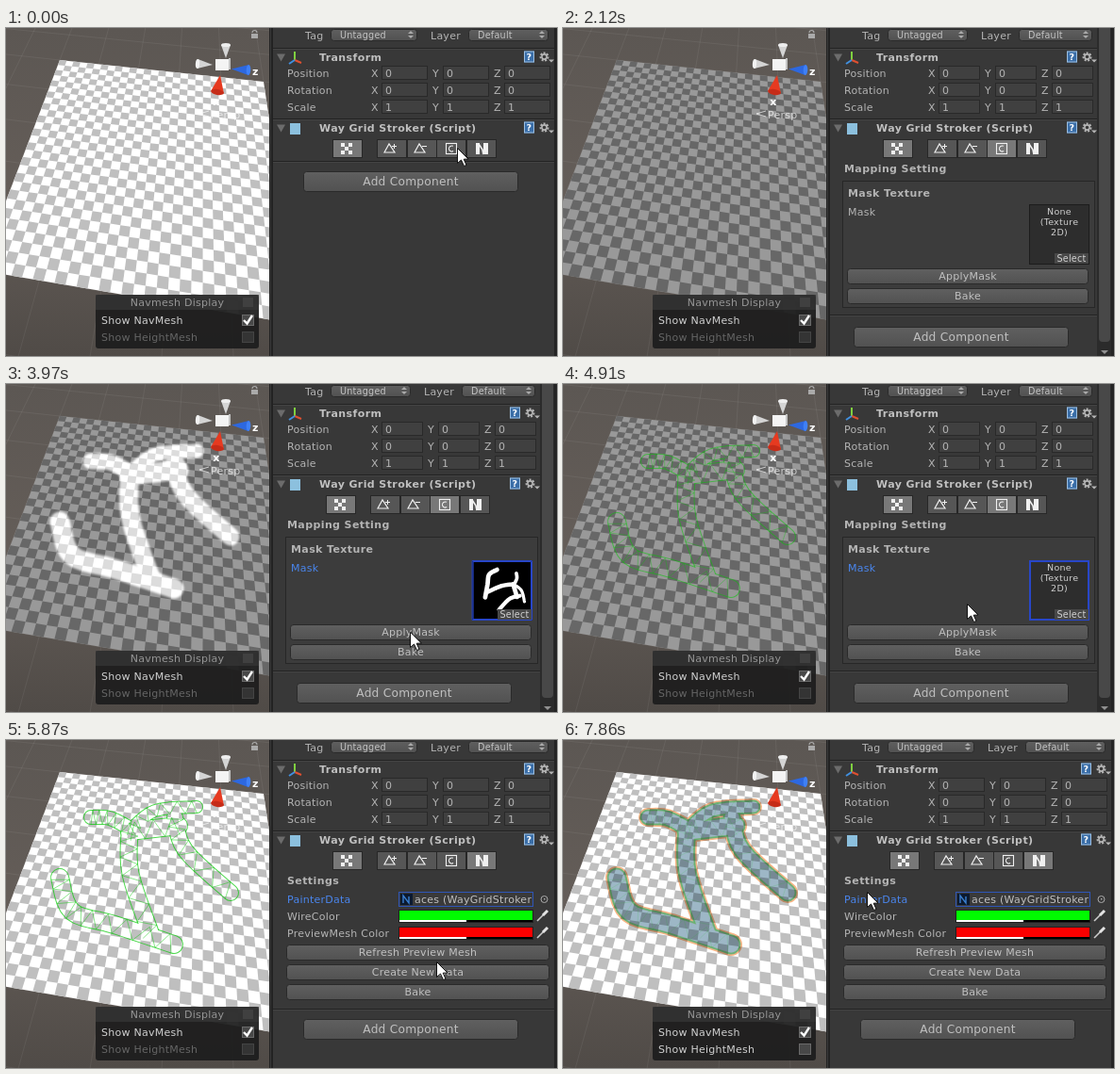
Recreate the animation shown at these times as an HTML page with a canvas. Size 584x348 px, loop 8000 ms.

```html
<!DOCTYPE html>
<html>
<head>
<meta charset="utf-8">
<style>
html, body { margin: 0; width: 584px; height: 348px; overflow: hidden; background: #383838; }
canvas { display: block; }
</style>
</head>
<body>
<canvas id="stage" width="584" height="348"></canvas>
<script>
const W = 584, H = 348, LOOP = 8000, CELLS = 28, STEP = 130;
let c = document.getElementById('stage').getContext('2d');

// ---------- drawing helpers ----------
function rect(x, y, w, h, fill) { c.fillStyle = fill; c.fillRect(x, y, w, h); }

function frame(x, y, w, h, color) {
  c.strokeStyle = color; c.lineWidth = 1;
  c.strokeRect(x + .5, y + .5, w - 1, h - 1);
}

function poly(points, fill, stroke, width = 1, open) {
  c.beginPath();
  points.forEach(([x, y]) => c.lineTo(x, y));
  if (!open) c.closePath();
  if (fill) { c.fillStyle = fill; c.fill(); }
  if (stroke) { c.strokeStyle = stroke; c.lineWidth = width; c.stroke(); }
}
const line = (points, color, width) => poly(points, null, color, width, true);
const triangle = (x, y, w, h, fill) => poly([[x - w, y - h], [x + w, y - h], [x, y + h]], fill);

function circle(x, y, r, color, width, from = 0, to = 7) {
  c.beginPath(); c.arc(x, y, r, from, to);
  c.strokeStyle = color; c.lineWidth = width; c.stroke();
}

// a cone whose tip lies (dx, dy) away from the middle of its base
function cone(x, y, dx, dy, r, side, base) {
  const len = Math.hypot(dx, dy), nx = -dy / len * r, ny = dx / len * r;
  poly([[x + nx, y + ny], [x - nx, y - ny], [x + dx, y + dy]], side);
  c.beginPath(); c.ellipse(x, y, r, r * .42, Math.atan2(ny, nx), 0, 7);
  c.fillStyle = base; c.fill();
}

// y is the middle of the capitals
function text(s, x, y, { color = '#b4b4b4', size = 11, bold = false, align = 'left' } = {}) {
  c.font = `${bold ? 'bold ' : ''}${size}px "DejaVu Sans", sans-serif`;
  c.letterSpacing = bold ? '.4px' : '.25px';
  c.textAlign = align; c.fillStyle = color;
  c.fillText(s, x, Math.round(y + size * .36));
}

function button(x, y, w, h, label, { size, pressed } = {}) {
  const g = c.createLinearGradient(0, y, 0, y + h);
  g.addColorStop(0, pressed ? '#505050' : '#606060');
  g.addColorStop(1, pressed ? '#5e5e5e' : '#515151');
  c.beginPath(); c.roundRect(x + .5, y + .5, w - 1, h - 1, 3);
  c.fillStyle = g; c.fill();
  c.strokeStyle = '#2a2a2a'; c.lineWidth = 1; c.stroke();
  text(label, x + w / 2, y + h / 2, { size, align: 'center', color: '#c0c0c0' });
}

function layer(draw) {
  const canvas = document.createElement('canvas'), saved = c;
  canvas.width = W; canvas.height = H;
  c = canvas.getContext('2d');
  draw();
  c = saved;
  return canvas;
}

// ---------- perspective ----------
function squareTo([x0, y0], [x1, y1], [x2, y2], [x3, y3]) {
  const ax = x1 - x2, ay = y1 - y2, bx = x3 - x2, by = y3 - y2;
  const sx = x0 - x1 + x2 - x3, sy = y0 - y1 + y2 - y3, d = ax * by - bx * ay;
  const g = (sx * by - bx * sy) / d, h = (ax * sy - sx * ay) / d;
  return [x1 - x0 + g * x1, x3 - x0 + h * x3, x0, y1 - y0 + g * y1, y3 - y0 + h * y3, y0, g, h, 1];
}
const inverse = ([a, b, p, d, e, q, g, h, i]) =>
  [e * i - q * h, p * h - b * i, b * q - p * e, q * g - d * i, a * i - p * g, p * d - a * q,
   d * h - e * g, b * g - a * h, a * e - b * d];
const apply = (m, x, y) => {
  const [X, Y, w] = [0, 3, 6].map(k => m[k] * x + m[k + 1] * y + m[k + 2]);
  return [X / w, Y / w];
};

const view = squareTo([57, 34], [273, 57], [312, 315], [-28, 257]), unview = inverse(view);
const project = (u, v) => apply(view, u, v);
const tile = (u, v, s) => [project(u, v), project(u + s, v), project(u + s, v + s), project(u, v + s)];

const plane = (light, dark) => layer(() => {
  poly(tile(0, 0, 1), light);
  for (let i = 0; i < CELLS; i++)
    for (let j = i % 2; j < CELLS; j += 2) poly(tile(i / CELLS, j / CELLS, 1 / CELLS), dark);
});

// ---------- painted strokes ----------
// Catmull-Rom curve through a few key points
function smooth(p, steps = 6) {
  const at = i => p[Math.max(0, Math.min(p.length - 1, i))];
  return Array.from({ length: (p.length - 1) * steps + 1 }, (_, n) => {
    const i = Math.floor(n / steps), t = n / steps - i;
    return [0, 1].map(k => {
      const [a, b, d, e] = [-1, 0, 1, 2].map(o => at(i + o)[k]);
      return b + .5 * t * (d - a + t * (2 * a - 5 * b + 4 * d - e + t * (3 * (b - d) + e - a)));
    });
  });
}
const strokes = [
  { width: 15, points: [[90, 82], [110, 83], [132, 94]] },
  { width: 13, points: [[132, 95], [158, 75], [202, 71]] },
  { width: 19, points: [[131, 97], [183, 91]] },
  { width: 17, points: [[179, 82], [190, 117], [238, 162]] },
  { width: 18, points: [[131, 97], [132, 142], [154, 207]] },
  { width: 19, points: [[57, 146], [70, 182], [115, 196], [178, 217]] }
].map(s => ({ ...s, points: smooth(s.points) }));

function brush(color, grow) {
  c.lineCap = c.lineJoin = 'round';
  for (const s of strokes) line(s.points, color, s.width + grow);
}

// triangle strip: every other point steps to the opposite side
function zigzag({ width, points }) {
  const sides = points.map(([x, y], i) => {
    const [ax, ay] = points[Math.max(0, i - 1)], [bx, by] = points[Math.min(points.length - 1, i + 1)];
    const k = (i % 2 - .5) * width / Math.hypot(bx - ax, by - ay);
    return [x + (by - ay) * k, y - (bx - ax) * k];
  });
  line(sides, '#00c80090', .8);
}

const brightPlane = plane('#fff', '#bfbfbf'), dimPlane = plane('#999', '#676767');
const maskLayer = layer(() => {
  c.filter = 'blur(1.1px)'; brush('#fff', 2); c.filter = 'none';
  c.globalCompositeOperation = 'source-in';
  c.drawImage(plane('#fff', '#dcdcdc'), 0, 0);
});
const wireLayer = layer(() => {
  brush('#00c800b0', 1);
  c.globalCompositeOperation = 'destination-out';
  brush('#000', -1);
  c.globalCompositeOperation = 'source-over';
  c.lineJoin = 'bevel';
  strokes.forEach(zigzag);
});
const meshLayer = layer(() => {
  c.filter = 'blur(.7px)';
  brush('#f7b584', 5); brush('#7fae88', 2); brush('#9db7c6', -2);
});
const ground = layer(() => {
  const g = c.createLinearGradient(0, 0, 0, H);
  g.addColorStop(0, '#5c5753'); g.addColorStop(.5, '#645d58'); g.addColorStop(1, '#504b47');
  rect(0, 0, 280, H, g);
  for (let k = -.6; k <= 1.7; k += .2) {
    line([project(k, -.4), project(k, 1.6)], '#ffffff10');
    line([project(-.6, k), project(1.6, k)], '#ffffff10');
  }
});

// ---------- scene view ----------
function gizmo() {
  const pale = '#ffffffa8', bold = { bold: true, color: '#fff' };
  cone(233, 18, 0, 14, 5, '#d4d4d4', '#eee');
  cone(203, 38, 16, 1, 5, '#d4d4d4', '#f2f2f2');
  cone(257, 44.5, -18, -1, 5.5, '#2d68e0', '#3f80f5');
  rect(222, 33, 14, 12, '#f4f4f4'); rect(236, 32, 2, 12, '#c4c4c4');
  cone(224, 68, 3, -18, 7, '#e63a20', '#c62c18');
  text('z', 261, 46, bold);
  text('x', 223, 78, { ...bold, align: 'center' });
  text('Persp', 217, 92, { color: pale });
  line([[215, 88], [205, 91], [215, 94]], pale);
  rect(260, 6, 7, 5, '#aaa');
  circle(263.5, 5, 2.5, '#aaa', 1.2, Math.PI, 0);
}

function checkRow(label, y, checked, enabled) {
  text(label, 101, y, { color: enabled ? '#d0d0d0' : '#656565' });
  rect(250, y - 6, 13, 12, enabled ? '#484848' : '#343434');
  frame(250, y - 6, 13, 12, enabled ? '#6a6a6a' : '#444');
  if (checked) line([[252, y], [255.5, y + 3.5], [261, y - 5]], '#fff', 2.4);
}

function display(baked) {
  c.beginPath(); c.roundRect(95, 283, 173, 57, 3); c.fillStyle = '#1d1d1dee'; c.fill();
  rect(95, 283, 173, 16, '#363636c0');
  rect(251, 286, 11, 10, '#404040');
  text('Navmesh Display', 181.5, 291, { color: '#959595', align: 'center' });
  checkRow('Show NavMesh', 310, true, true);
  checkRow('Show HeightMesh', 328, false, baked);
}

function scene(st) {
  c.save();
  c.beginPath(); c.rect(0, 0, 279, H); c.clip();
  c.drawImage(ground, 0, 0);
  c.drawImage(st.dim ? dimPlane : brightPlane, 0, 0);
  if (st.mask) c.drawImage(maskLayer, 0, 0);
  if (st.baked) {
    c.globalCompositeOperation = 'multiply';
    c.drawImage(meshLayer, 0, 0);
    c.globalCompositeOperation = 'source-over';
  }
  if (st.wired) {
    c.globalAlpha = st.baked ? .25 : st.dim ? .75 : 1;
    c.drawImage(wireLayer, 0, 0);
    c.globalAlpha = 1;
  }
  gizmo();
  display(st.baked);
  c.restore();
}

// ---------- inspector ----------
function divider(y, right) { rect(283, y, right - 283, 1, '#222'); rect(283, y + 1, right - 283, 1, '#444'); }

function popup(x, w, label) {
  button(x, 1, w, 13, '');
  text(label, x + 10, 7.5, { size: 9.6, color: '#c4c4c4' });
  triangle(x + w - 7, 4.5, 3, -1.5, '#aaa');
  triangle(x + w - 7, 9.5, 3, 1.5, '#aaa');
}

function header(title, y, right) {
  triangle(291.5, y, 4.5, 4, '#6c6c6c');
  text(title, 332, y, { bold: true, color: '#c0c0c0' });
  rect(right - 32, y - 7, 11, 12, '#3a6ea8'); frame(right - 32, y - 7, 11, 12, '#9dbfe0');
  text('?', right - 26.5, y - 1, { size: 9.5, bold: true, align: 'center', color: '#fff' });
  c.setLineDash([2, 1.5]);
  circle(right - 10.5, y - 1, 4, '#b5b5b5', 2);
  c.setLineDash([]);
  circle(right - 10.5, y - 1, 2.6, '#b5b5b5', 1.6);
  triangle(right - 3, y + 3.5, 3, 1.5, '#b5b5b5');
}

function transform(right) {
  header('Transform', 31.5, right);
  line([[306, 34], [306, 25]], '#7fd040', 2);
  line([[306, 34], [313, 37]], '#e05030', 2);
  line([[306, 34], [300, 38]], '#4090e0', 2);
  const pitch = (right - 386) / 3;
  ['Position', 'Rotation', 'Scale'].forEach((name, row) => {
    const y = 48 + row * 18;
    text(name, 298, y);
    ['X', 'Y', 'Z'].forEach((axis, col) => {
      const x = 387 + col * pitch;
      text(axis, x, y);
      rect(x + 11, y - 8, pitch - 16, 15, '#404040'); frame(x + 11, y - 8, pitch - 16, 15, '#292929');
      text(row === 2 ? '1' : '0', x + 15, y);
    });
  });
}

function tabs(dx, active) {
  const ink = '#f0f0f0';
  const cell = (x, on) => {
    rect(x, 118, 31, 20, on ? '#787878' : '#565656');
    frame(x, 118, 32, 20, '#272727');
  };
  c.save();
  c.translate(dx, 0);
  cell(346, true);
  for (let i = 0; i < 9; i += 2) rect(355 + i % 3 * 4, 122 + (i / 3 | 0) * 4, 4, 4, ink);
  for (let i = 0; i < 4; i++) cell(393 + Math.round(i * 31.5), active === i);
  for (const x of [401, 433]) {
    poly([[x, 132], [x + 5, 123], [x + 11, 132]], null, ink, 1.2);
    rect(x + 8, 125, 5, 1, ink);
  }
  rect(411, 123, 1, 5, ink);
  c.strokeStyle = ink; c.lineWidth = 1.1; c.strokeRect(466.5, 122.5, 11, 11);
  circle(472.5, 128, 3, ink, 1.1, 1, 5.2);
  rect(498, 122, 4, 12, ink); rect(506, 122, 5, 12, ink);
  line([[501, 123], [505, 129], [506, 134]], ink, 1.6);
  c.restore();
}

function thumbnail() {
  c.lineCap = c.lineJoin = 'round';
  for (const s of strokes)
    line(s.points.map(([x, y]) => {
      const [u, v] = apply(unview, x, y);
      return [494 + 64 * (1 - v), 187 + 64 * u];
    }), '#fff', s.width / 4);
}

function mappingTab(st) {
  text('Mapping Setting', 298, 149, { bold: true });
  rect(296, 162, 268, 135, '#3c3c3c'); frame(296, 162, 268, 135, '#272727');
  text('Mask Texture', 302, 175, { bold: true });
  text('Mask', 302, 195, { color: st.focus ? '#4a86ee' : '#b4b4b4' });
  rect(494, 187, 64, 64, st.mask ? '#000' : '#2d2d2d');
  if (st.mask) thumbnail();
  else ['None', '(Texture', '2D)'].forEach((s, i) =>
    text(s, 526, 194.5 + i * 11, { size: 9.5, align: 'center', color: '#d0d0d0' }));
  frame(494, 187, 64, 64, st.focus ? '#2846c8' : '#1c1c1c');
  if (st.focus) frame(495, 188, 62, 62, '#2846c8');
  rect(521, 239, 36, 11, '#484848');
  text('Select', 539, 244.5, { size: 9.6, align: 'center', color: '#d0d0d0' });
  button(301, 255, 256, 17, 'ApplyMask', { pressed: st.applying });
  button(301, 276, 256, 17, 'Bake');
  return 304;
}

function colorRow(label, y, color) {
  text(label, 298, y);
  rect(416, y - 7, 143, 14, '#202020');
  rect(417, y - 6, 141, 10, color);
  rect(417, y + 4, 71, 2, '#fff'); rect(488, y + 4, 70, 2, '#000');
  line([[563, y + 5], [570, y - 2]], '#ccc', 1.6);
  line([[569, y - 1], [574, y - 6]], '#e4e4e4', 3);
}

function settingsTab(st) {
  text('Settings', 298, 149, { bold: true });
  text('PainterData', 298, 169, { color: '#4a86ee' });
  rect(416, 161, 143, 16, '#3a3a3a'); frame(416, 161, 143, 16, '#2f56b8');
  rect(418, 163, 13, 12, '#0c1a30');
  line([[421, 173], [421, 165], [427, 173], [427, 166]], '#3a7fd0', 1.4);
  c.save();
  c.beginPath(); c.rect(417, 162, 140, 14); c.clip();
  text('aces (WayGridStroker', 433, 169, { color: '#c0c0c0' });
  c.restore();
  circle(570.5, 169, 3.5, '#aaa', 1);
  rect(570, 168, 1.5, 1.5, '#aaa');
  colorRow('WireColor', 187, '#00fb00');
  colorRow('PreviewMesh Color', 205, '#fb0000');
  ['Refresh Preview Mesh', 'Create New Data', 'Bake'].forEach((label, i) =>
    button(297, 217 + i * 21, 279, 17, label, { pressed: i === 2 && st.baking }));
  return 285;
}

function inspector(st) {
  const mapping = st.tab === 'mapping', right = mapping ? 566 : 581, dx = mapping ? -7 : 0;
  rect(279, 0, 305, H, '#383838');
  rect(279, 0, 4, H, '#222'); rect(280, 0, 1, H, '#3a3a3a');
  text('Tag', 317, 8);
  popup(344, 92 + dx, 'Untagged');
  text('Layer', 450 + dx, 8);
  popup(490 + dx, 85 + dx, 'Default');
  divider(21, right);
  transform(right);
  divider(96, right);
  header('Way Grid Stroker (Script)', 106.5, right);
  rect(301, 101, 11, 12, '#8cc0de');
  tabs(dx, st.lit);
  const end = mapping ? mappingTab(st) : st.tab === 'settings' ? settingsTab(st) : 141;
  divider(end, right);
  button(315 + dx, end + (mapping ? 13 : 11), 228, 22, 'Add Component', { size: 12.2 });
  if (mapping) {
    rect(566, 0, 15, H, '#2b2b2b');
    c.beginPath(); c.roundRect(568, -5, 12, 338, 4); c.fillStyle = '#484848'; c.fill();
    triangle(574, 344, 4, 2, '#909090');
  }
  rect(581, 0, 3, H, '#242424');
}

// ---------- pointer ----------
const moves = [
  { at: 0, x: 478, y: 127 },
  { at: 590, time: 150, x: 471, y: 126 },
  { at: 960, time: 450, x: 530, y: 239 },
  { at: 1970, x: 417, y: 294 },
  { at: 3110, time: 860, x: 428, y: 262 },
  { at: 4910, x: 428, y: 233 },
  { at: 4930, time: 600, x: 489, y: 130 },
  { at: 5740, time: 120, x: 456, y: 235 },
  { at: 5870, time: 390, x: 421, y: 267 },
  { at: 7080, time: 480, x: 372, y: 118 },
  { at: 7590, time: 260, x: 322, y: 161 }
];

// eased moves, refreshed only once per step as in a screen recording
function pointerAt(t) {
  const i = moves.findLastIndex(m => m.at <= t), to = moves[i], from = moves[i - 1] || to;
  const p = to.time ? Math.min(1, Math.floor((t - to.at) / STEP) * STEP / to.time) : 1;
  const k = p * p * (3 - 2 * p);
  return [from.x + (to.x - from.x) * k, from.y + (to.y - from.y) * k].map(Math.round);
}

function pointer(t, busy) {
  const [x, y] = pointerAt(t);
  if (busy) {
    circle(x + .5, y, 7, '#d8f0f2', 5);
    circle(x + .5, y, 7, '#1f98a8', 3);
    circle(x + .5, y, 7, '#8fe4ec', 3, t / 150, t / 150 + 1.6);
    return;
  }
  c.lineJoin = 'miter';
  poly([[0, 0], [0, 16], [4, 12.5], [7, 19], [9.5, 18], [6.7, 11.7], [11.5, 11.5]].map(([a, b]) => [x + a + .5, y + b + .5]),
    '#fff', '#111', 1);
}

// ---------- timeline ----------
function draw() {
  const t = performance.now() % LOOP, during = (a, b = LOOP) => t >= a && t < b;
  const st = {
    tab: during(0, 590) ? 'none' : during(590, 5610) ? 'mapping' : 'settings',
    lit: during(430, 5480) ? 2 : during(5480) ? 3 : -1,
    dim: during(740, 5870),
    mask: during(2990, 4910),
    focus: during(3110),
    applying: during(4250, 4530),
    wired: during(4530),
    baking: during(6660, 6930),
    baked: during(6930)
  };
  c.lineCap = 'butt'; c.lineJoin = 'miter';
  scene(st);
  c.lineCap = 'butt'; c.lineJoin = 'miter';
  inspector(st);
  if (!during(2120, 3110)) pointer(t, st.baking);
  requestAnimationFrame(draw);
}
draw();
</script>
</body>
</html>
```
